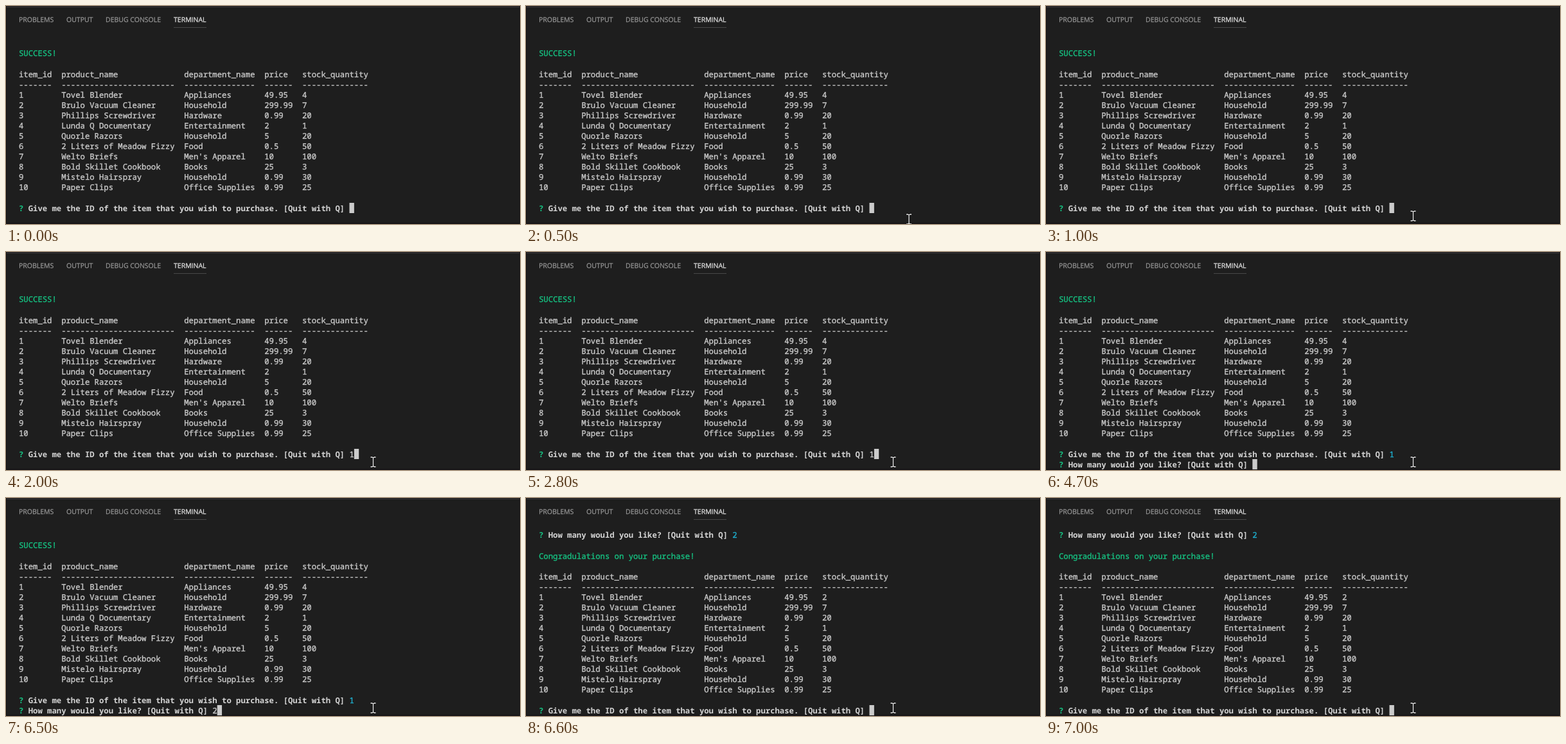
Recreate the animation shown at these times as an HTML page with a canvas. Size 800 by 340 pixels, loop 7100 ms.

```html
<!DOCTYPE html>
<html lang="en">
<head>
<meta charset="utf-8">
<title>Store terminal</title>
<style>
  html, body { margin: 0; width: 100%; height: 100%; overflow: hidden; background: #1e1e1e; }
  canvas { display: block; width: 800px; height: 340px; }
</style>
</head>
<body>
<canvas id="stage" width="800" height="340"></canvas>
<script>
const ctx = document.getElementById('stage').getContext('2d');

const LOOP = 7100;
const TIME = { pointerIn: 100, pointerRest: 950, typeId: 2000, enterId: 3600, typeCount: 5900, enterCount: 6600 };
const CELL = { x: 20, y: 50, w: 7.35, h: 16.07 };
const MONO = '12.25px "Noto Sans Mono", monospace';
const COLOR = { text: '#cccccc', bold: '#d4d4d4', green: '#16c282', cyan: '#1fb0d0', cursor: '#cbcbcb' };

const TABS = [['PROBLEMS', 20], ['OUTPUT', 94], ['DEBUG CONSOLE', 155], ['TERMINAL', 261]];
const COLUMNS = [0, 9, 35, 52, 60];
const HEADER = ['item_id', 'product_name', 'department_name', 'price', 'stock_quantity'];
const DASHES = [7, 24, 15, 6, 14].map(n => '-'.repeat(n));
const ITEMS = [
  ['Tovel Blender', 'Appliances', '49.95', 4],
  ['Brulo Vacuum Cleaner', 'Household', '299.99', 7],
  ['Phillips Screwdriver', 'Hardware', '0.99', 20],
  ['Lunda Q Documentary', 'Entertainment', '2', 1],
  ['Quorle Razors', 'Household', '5', 20],
  ['2 Liters of Meadow Fizzy', 'Food', '0.5', 50],
  ['Welto Briefs', "Men's Apparel", '10', 100],
  ['Bold Skillet Cookbook', 'Books', '25', 3],
  ['Mistelo Hairspray', 'Household', '0.99', 30],
  ['Paper Clips', 'Office Supplies', '0.99', 25],
];
const ASK_ID = 'Give me the ID of the item that you wish to purchase. [Quit with Q] ';
const ASK_COUNT = 'How many would you like? [Quit with Q] ';

function rect(x, y, w, h, color) {
  ctx.fillStyle = color;
  ctx.fillRect(x, y, w, h);
}

// Fills text; a thin outline gives regular weights a little more body.
function label(text, x, y, font, color, outline) {
  ctx.font = font;
  ctx.fillStyle = ctx.strokeStyle = color;
  ctx.fillText(text, x, y);
  if (outline) {
    ctx.lineWidth = outline;
    ctx.strokeText(text, x, y);
  }
}

// Writes text on the terminal grid, one character per cell.
function write(text, row, col = 0, color = COLOR.text, bold = false) {
  const font = (bold ? 'bold ' : '') + MONO;
  const baseline = CELL.y + row * CELL.h + 12.4;
  [...String(text)].forEach((char, i) => {
    if (char !== ' ') label(char, CELL.x + (col + i) * CELL.w, baseline, font, color, bold ? 0 : 0.35);
  });
}

function drawPrompt(question, row, answer, active) {
  const end = 2 + question.length;
  write('?', row, 0, COLOR.green, true);
  write(question, row, 2, COLOR.bold, true);
  write(answer, row, end, active ? COLOR.text : COLOR.cyan);
  if (active) {
    const x = CELL.x + (end + answer.length) * CELL.w;
    rect(x, Math.round(CELL.y + row * CELL.h), CELL.w, 16, COLOR.cursor);
  }
}

function drawTable(top, firstStock) {
  const writeRow = (cells, row) => cells.forEach((cell, i) => write(cell, row, COLUMNS[i]));
  writeRow(HEADER, top);
  writeRow(DASHES, top + 1);
  ITEMS.forEach(([name, department, price, stock], i) =>
    writeRow([i + 1, name, department, price, i ? stock : firstStock], top + 2 + i));
}

function drawPanel() {
  rect(0, 0, 800, 340, '#1e1e1e');
  rect(0, 0, 800, 1, '#1a181a');
  rect(0, 1, 800, 1, '#3c3a3c');
  rect(0, 0, 1, 340, '#121012');
  rect(799, 0, 1, 340, '#121012');
  rect(0, 338, 800, 2, '#171517');
  for (const [name, x] of TABS) {
    const color = name === 'TERMINAL' ? '#e7e7e7' : '#979797';
    label(name, x, 24.5, '10.5px "Open Sans", sans-serif', color, 0.25);
  }
  rect(261, 33, 51, 1, '#484848');
}

function drawPointer(t) {
  if (t < TIME.pointerIn) return;
  const p = Math.min(1, (t - TIME.pointerIn) / (TIME.pointerRest - TIME.pointerIn));
  const left = (1 - p) ** 2;
  ctx.save();
  ctx.translate(571.5 + 88 * left, 327.5 + 18 * left);
  ctx.beginPath();
  for (const side of [-1, 1]) {
    ctx.moveTo(-4, 7.5 * side);
    ctx.lineTo(-1.5, 7.5 * side);
    ctx.lineTo(0, 6.5 * side);
    ctx.lineTo(1.5, 7.5 * side);
    ctx.lineTo(4, 7.5 * side);
  }
  ctx.moveTo(0, -6.5);
  ctx.lineTo(0, 6.5);
  for (const [width, color] of [[3, '#101010'], [1.3, '#eeeeee']]) {
    ctx.lineWidth = width;
    ctx.strokeStyle = color;
    ctx.stroke();
  }
  ctx.restore();
}

function draw(t) {
  drawPanel();
  if (t < TIME.enterCount) {
    const idEntered = t >= TIME.enterId;
    write('SUCCESS!', 1, 0, COLOR.green);
    drawTable(3, 4);
    drawPrompt(ASK_ID, 16, t >= TIME.typeId ? '1' : '', !idEntered);
    if (idEntered) drawPrompt(ASK_COUNT, 17, t >= TIME.typeCount ? '2' : '', true);
  } else {
    drawPrompt(ASK_COUNT, 0, '2', false);
    write('Congradulations on your purchase!', 2, 0, COLOR.green);
    drawTable(4, 2);
    drawPrompt(ASK_ID, 17, '', true);
  }
  drawPointer(t);
}

ctx.textRendering = 'geometricPrecision';
ctx.lineJoin = 'round';
function frame() {
  draw(performance.now() % LOOP);
  requestAnimationFrame(frame);
}
frame();
</script>
</body>
</html>
```
